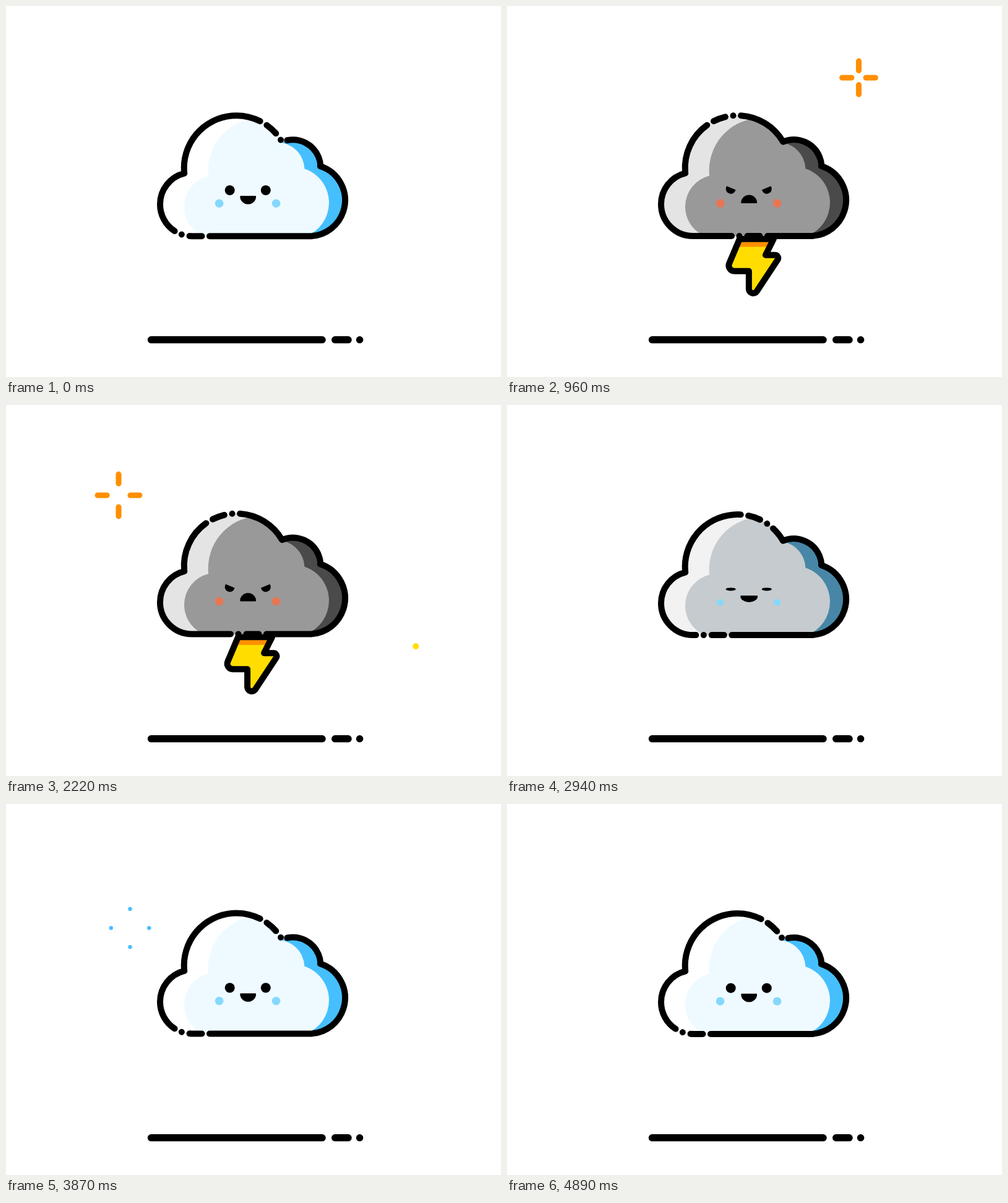
An HTML page with a canvas for the animation above (4.92 s loop, 800x600 px).

```html
<!DOCTYPE html>
<html>
<head>
<meta charset="utf-8">
<style>
  html, body { margin: 0; height: 100%; overflow: hidden; background: #fff; }
  canvas { display: block; }
</style>
</head>
<body>
<canvas id="stage" width="800" height="600"></canvas>
<script>
const ctx = document.getElementById('stage').getContext('2d');
const LOOP = 4920, STEP = 30, TAU = Math.PI * 2;
const BLUE = '#46bfff', ORANGE = '#ff8f00', YELLOW = '#ffdd00';

const clamp = x => Math.max(0, Math.min(1, x));
const smooth = x => { x = clamp(x); return x * x * (3 - 2 * x); };
const ramp = (t, from, to) => smooth((t - from) / (to - from));
const mix = (a, b, p) => 'rgb(' + a.map((v, i) => Math.round(v + (b[i] - v) * p)) + ')';

// 0 = calm, 1 = angry; each part changes with its own delay and duration
const ANGER = 170, RELIEF = 2700;
const mood = (t, delay, span) =>
  ramp(t, ANGER + delay, ANGER + delay + span) - ramp(t, RELIEF + delay, RELIEF + delay + span);

const float = t => 3.1 * (Math.cos(TAU * (t / 984 - 0.065)) - Math.cos(TAU * 0.065));

// ---- shapes ----
function cloudPath() {
  const path = new Path2D();
  const lobe = (cx, cy, r, x1, y1, x2, y2) =>
    path.arc(cx, cy, r, Math.atan2(y1 - cy, x1 - cx), Math.atan2(y2 - cy, x2 - cx));
  path.moveTo(494.5, 372.2);
  lobe(300.5, 320.7, 51.5, 300.5, 372, 288, 269.5);
  lobe(372.5, 262, 84.8, 288, 269.5, 446, 219.5);
  lobe(463.5, 261.3, 45, 446, 219.5, 508, 258.5);
  lobe(490, 314.2, 58, 508, 258.5, 494.5, 372);
  path.closePath();
  return path;
}

function boltPath() {
  const path = new Path2D();
  path.moveTo(376, 377);
  path.arcTo(354, 429, 391, 429, 9);
  path.lineTo(391, 429);
  path.arcTo(391, 481, 442.6, 403, 7);
  path.arcTo(442.6, 403, 418, 403, 5);
  path.lineTo(418, 403);
  path.lineTo(431, 377);
  path.closePath();
  return path;
}

function shifted(path, dx, dy) {
  const moved = new Path2D();
  moved.addPath(path, new DOMMatrix().translate(dx, dy));
  return moved;
}

const cloud = cloudPath();
const bolt = boltPath();
const body = shifted(cloud, -26, 4);
const crown = new Path2D();
crown.arc(372.5, 262, 84.8, 0, TAU);
const highlight = shifted(cloud, 39, 4);
highlight.rect(0, 0, 800, 600);

const GAPS = [12.5, 20, 13, 0.01, 12.5];
const OUTLINE = [165.5, ...GAPS, 301, ...GAPS, 9999, 0];

// ---- particles ----
// x, y, size, then start times of the orange and blue bursts
const STARS = [
  [568.5, 116, 48, 783, 4000],
  [455, 77, 24.5, 1140, 4090],
  [645, 300.5, 18.5, 1354, 3117],
  [200.5, 200.5, 34, 1533, 3350],
  [182, 146, 48, 1982, 4340]
];
// x, y, then peak times of the yellow and blue dots
const DOTS = [
  [221, 121, 740, -999],
  [142.5, 390, 1630, 4335],
  [558.5, 234, 1800, 3500],
  [662.3, 390.3, 2171, 3735]
];

function star(x, y, size, age, color) {
  if (age <= 0 || age > 535) return;
  const reach = 1 - (1 - clamp(age / 430)) ** 2;
  const outer = size * Math.max(0, reach - 0.095);
  const inner = Math.min(outer - 0.01, size * 0.905 * smooth(age / 520));
  ctx.strokeStyle = color;
  ctx.lineWidth = size * 0.19 * clamp(age / 60);
  ctx.beginPath();
  for (const [dx, dy] of [[1, 0], [0, 1], [-1, 0], [0, -1]]) {
    ctx.moveTo(x + dx * inner, y + dy * inner);
    ctx.lineTo(x + dx * outer, y + dy * outer);
  }
  ctx.stroke();
}

function disc(x, y, r, color) {
  ctx.fillStyle = color;
  ctx.beginPath();
  ctx.arc(x, y, r, 0, TAU);
  ctx.fill();
}

function dot(x, y, age, color) {
  const r = 7 * (age < 0 ? smooth(1 + age / 200) : 1 - smooth(age / 140));
  if (r > 0) disc(x, y, r, color);
}

function drawParticles(t) {
  for (const [x, y, size, orange, blue] of STARS) {
    star(x, y, size, t - orange, ORANGE);
    star(x, y, size, t - blue, BLUE);
  }
  for (const [x, y, yellow, blue] of DOTS) {
    dot(x, y, t - yellow, YELLOW);
    dot(x, y, t - blue, BLUE);
  }
}

// ---- scene ----
function drawGround() {
  ctx.strokeStyle = '#000';
  ctx.lineWidth = 11.6;
  ctx.beginPath();
  for (const [from, to] of [[234.6, 511], [531.8, 553], [571.6, 571.61]]) {
    ctx.moveTo(from, 539.8);
    ctx.lineTo(to, 539.8);
  }
  ctx.stroke();
}

function drawBolt(t, lift) {
  const out = ramp(t, 550, 760) - ramp(t, 2460, 2670);
  if (out <= 0) return;
  const hidden = 98 * (out - 1);
  ctx.save();
  ctx.translate((lift + hidden) * 0.52, lift + hidden);
  ctx.fillStyle = YELLOW;
  ctx.fill(bolt);
  ctx.save();
  ctx.clip(bolt);
  ctx.fillStyle = ORANGE;
  ctx.fillRect(300, 300, 200, 89.7 - hidden);
  ctx.restore();
  ctx.strokeStyle = '#000';
  ctx.lineWidth = 10;
  ctx.stroke(bolt);
  ctx.restore();
}

function drawCloud(t) {
  const tone = mood(t, 0, 470);
  ctx.save();
  ctx.clip(cloud);
  ctx.fillStyle = mix([70, 191, 255], [74, 74, 74], tone);
  ctx.fill(cloud);
  ctx.fillStyle = mix([238, 250, 255], [153, 153, 153], tone);
  ctx.fill(body);
  ctx.fill(crown);
  ctx.fillStyle = mix([255, 255, 255], [228, 228, 228], tone);
  ctx.fill(highlight, 'evenodd');
  ctx.restore();

  ctx.strokeStyle = '#000';
  ctx.lineWidth = 10;
  ctx.setLineDash(OUTLINE);
  ctx.lineDashOffset = 92 * mood(t, 0, 410);
  ctx.stroke(cloud);
  ctx.setLineDash([]);
}

function drawEye(x, mirror, blink) {
  ctx.save();
  ctx.translate(x, 298);
  ctx.scale(mirror, Math.max(0.06, Math.abs(1 - 2 * blink)));
  ctx.fillStyle = '#000';
  ctx.beginPath();
  if (blink > 0.5) ctx.arc(0, -2, 8, 0.2, Math.PI + 0.6);
  else ctx.arc(0, 0, 8, 0, TAU);
  ctx.fill();
  ctx.restore();
}

function drawFace(t) {
  const blink = mood(t, 40, 330);
  const turn = mood(t, 0, 300);
  const flip = 1 - 2 * turn;

  drawEye(361.7, 1, blink);
  drawEye(419.8, -1, blink);

  const cheek = turn > 0.5 ? '#e87653' : '#85d8fc';
  for (const x of [344.6, 436.6]) disc(x, 319.3, 6.8 * Math.abs(flip), cheek);

  ctx.save();
  ctx.translate(391.2, 313.2);
  ctx.scale(1 + 0.4 * (1 - Math.abs(flip)), flip || 0.01);
  ctx.fillStyle = ctx.strokeStyle = '#000';
  ctx.lineWidth = 2.2;
  ctx.beginPath();
  ctx.ellipse(0, -5, 11.8, 11.3, 0, 0, Math.PI);
  ctx.closePath();
  ctx.fill();
  ctx.stroke();
  ctx.restore();
}

function draw(t) {
  const lift = float(t);
  ctx.fillStyle = '#fff';
  ctx.fillRect(0, 0, 800, 600);
  ctx.lineCap = ctx.lineJoin = 'round';
  drawGround();
  drawParticles(t);
  drawBolt(t, lift);
  ctx.save();
  ctx.translate(0, lift);
  drawCloud(t);
  drawFace(t);
  ctx.restore();
}

const start = performance.now();
function tick() {
  const t = (performance.now() - start) % LOOP;
  draw(Math.floor(t / STEP) * STEP);
  requestAnimationFrame(tick);
}
tick();
</script>
</body>
</html>
```
